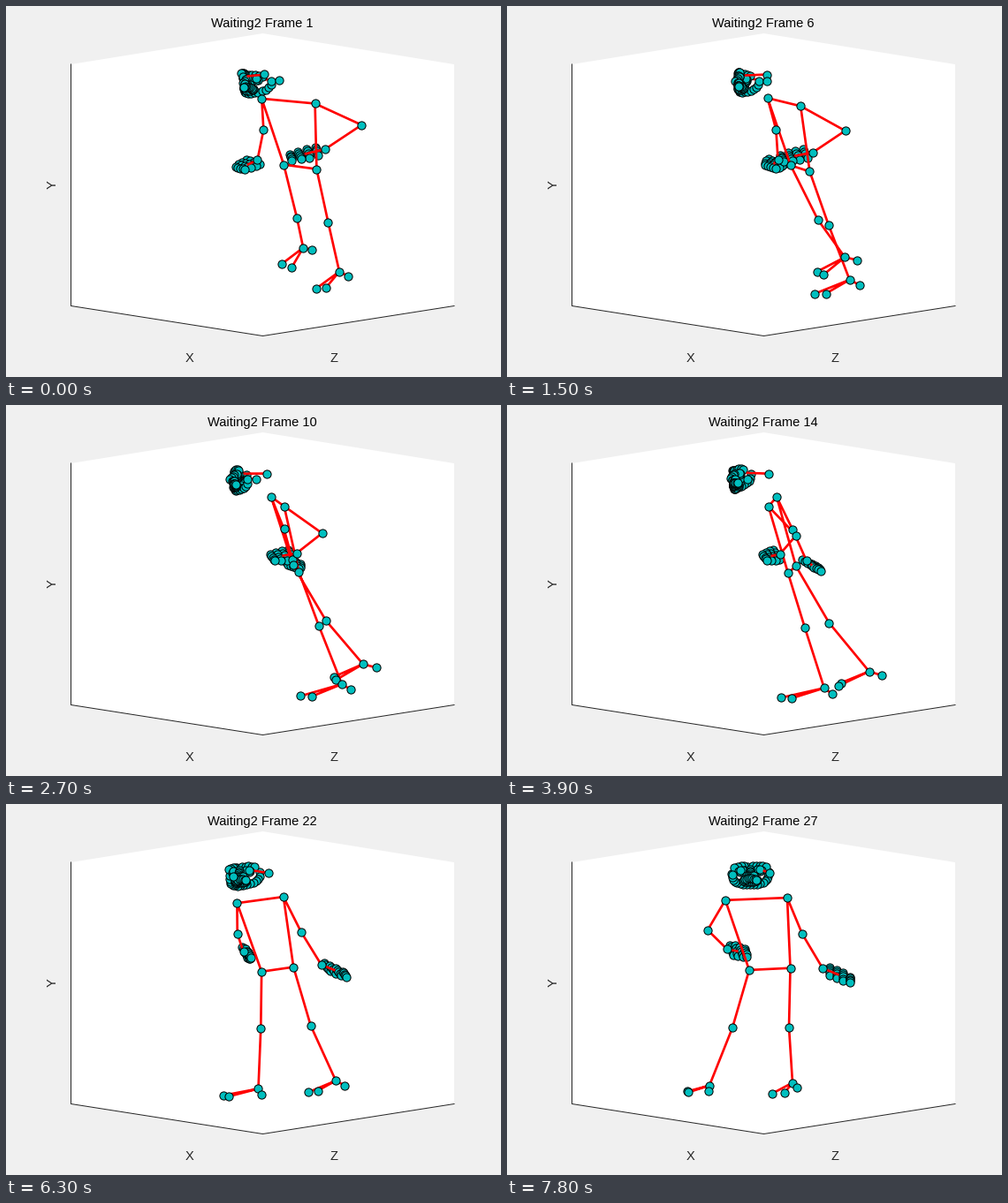
Write a matplotlib script that moves like this. It is 560 px wide and 420 px high and loops after 8000 ms.

```python
import numpy as np
import matplotlib.pyplot as plt
from matplotlib.animation import FuncAnimation

W, H, DPI = 560, 420, 100
PX = 72 / DPI
STEP_MS, TICK_MS, LOOP_MS = 300, 100, 8000
LAST_STEP, TURN = 26, np.radians(4.5)
INK, RED, TEAL = "#262626", "red", (0, 0.75, 0.75)

# Turning axis of each body level: screen x, view tilt, sideways roll.
LEVELS = dict(head=(292.5, 0.12, 0), arms=(301, 0.18, 0), hips=(307, 0.18, 0),
              knees=(280, 0.09, 0), feet=(242, 0.15, 0.08))

# Joints in the final pose: sideways from the axis, height on screen, depth.
SIDES = (
    dict(ear=(4, 78, 2), shoulder=(16, 107, -5), elbow=(33, 146, 6), wrist=(56, 184, 10),
         hip=(13.5, 183, 15), knee=(39, 246, 75), ankle=(81, 287, 147),
         big_toe=(72, 304, 115), small_toe=(58, 305, 121), heel=(86, 290, 161)),
    dict(ear=(-38, 80, -1), shoulder=(-54, 104, 27), elbow=(-74, 129, 76),
         wrist=(-52, 157, 41), hip=(-33, 182, 33), knee=(-25, 246, 82),
         ankle=(-13, 298, 145), big_toe=(-38, 313, 103), small_toe=(-37, 312, 116),
         heel=(-14, 303, 156)),
)
LEVEL_OF = dict(ear="head", shoulder="arms", elbow="arms", wrist="arms",
                hip="hips", knee="knees")
LIMBS = (("shoulder", "elbow", "wrist"), ("shoulder", "hip", "knee", "ankle"),
         ("big_toe", "ankle", "small_toe"), ("ankle", "heel"))

# Each hand: reach from the wrist to the fingertips, and half the fan of the fingers.
HANDS = ((np.array([31, 14, -6]), np.array([0, 3, 9])),
         (np.array([21, 10, -33]), np.array([2, 5.5, 3])))


def project(points, level, angle):
    """Turn points about the axis of their level and drop them on the screen."""
    axis, tilt, roll = LEVELS[level]
    x, y, z = np.asarray(points, float).T
    across = x * np.cos(angle) + z * np.sin(angle)
    near = z * np.cos(angle) - x * np.sin(angle)
    return np.column_stack([axis + across, y + tilt * near + roll * across])


def head_points(u, down, forward):
    """Sideways fraction, drop and reach of the face, which looks slightly askew."""
    u, down, forward = np.broadcast_arrays(u, down, forward)
    return np.column_stack([42 * u - 17.5, 78 + down, -forward - 11 * u])


def face_model():
    a = np.linspace(0, np.pi, 17)
    parts = [head_points(0.49 * np.cos(a), 2 + 15 * np.sin(a)**0.7,
                         16 + 14 * np.sin(a)**2)]
    ring = np.linspace(0, 2 * np.pi, 6, endpoint=False)
    brow = np.linspace(0.08, 0.42, 5)
    for side in (-1, 1):
        parts.append(head_points(side * brow, -3 - 1.5 * np.sin(7 * brow), 33 - 18 * brow))
        parts.append(head_points(side * (0.22 + 0.08 * np.cos(ring)),
                                 1 + 1.2 * np.sin(ring), 29 - 2 * np.cos(ring)))
    parts.append(head_points(0, np.linspace(0, 5, 4), np.linspace(31, 36, 4)))
    nostrils = np.linspace(-0.1, 0.1, 5)
    parts.append(head_points(nostrils, 7, 33 - 20 * abs(nostrils)))
    ring = np.linspace(0, 2 * np.pi, 20, endpoint=False)
    parts.append(head_points(0.18 * np.cos(ring), 12 + 2 * np.sin(ring),
                             32 - 3 * np.cos(ring)**2))
    return np.vstack(parts)


def hand_model(wrist, reach, fan):
    finger, along = np.meshgrid(np.linspace(-1, 1, 5), np.linspace(0.25, 1, 4))
    along, finger = along.ravel()[:, None], finger.ravel()[:, None]
    return wrist + along * reach + finger * fan * np.sin(1 + 1.4 * along)


FACE = face_model()
TEMPLES = head_points(np.array([0.35, -0.2]), 0, np.array([20, 31]))
GRIPS = [np.array(side["wrist"]) + 0.6 * reach for side, (reach, _) in zip(SIDES, HANDS)]

fig = plt.figure(figsize=(W / DPI, H / DPI), dpi=DPI, facecolor="#f0f0f0")
ax = fig.add_axes([0, 0, 1, 1])
ax.set(xlim=(0, W), ylim=(H, 0))
ax.axis("off")

ax.fill([73.5, 290.5, 507, 507, 290.5, 73.5], [66, 31, 66, 340, 374, 340],
        color="white", lw=0)
ax.plot([73.5, 73.5, 290.5, 507], [66, 339.5, 373.5, 339.5], color=INK, lw=PX)

font = dict(family="Liberation Sans", size=14.67 * PX, ha="center")
title = ax.text(290, 24, "", color="black", va="baseline", **font)
ax.text(208, 403, "X", color=INK, va="baseline", **font)
ax.text(371, 403, "Z", color=INK, va="baseline", **font)
ax.text(53, 202, "Y", color=INK, va="center", rotation=90, **font)


def lines(zorder):
    return ax.plot([], [], color=RED, lw=2.67 * PX, solid_capstyle="butt",
                   solid_joinstyle="round", zorder=zorder)[0]


def dots(zorder):
    return ax.plot([], [], "o", ms=9.2 * PX, mfc=TEAL, mec="black", mew=PX,
                   zorder=zorder)[0]


hidden_strut, clusters, bones, joints = lines(3), dots(4), lines(5), dots(6)


def draw(frame):
    step = frame * TICK_MS // STEP_MS
    angle = TURN * (LAST_STEP - step)
    poses = [{name: project([p], LEVEL_OF.get(name, "feet"), angle)[0]
              for name, p in side.items()} for side in SIDES]
    temples = project(TEMPLES, "head", angle)
    grips = project(GRIPS, "arms", angle)
    hands = [project(hand_model(side["wrist"], *hand), "arms", angle)
             for side, hand in zip(SIDES, HANDS)]

    chains = [[pose[name] for name in limb] for pose in poses for limb in LIMBS]
    chains += [[pose[name] for pose in poses] for name in ("shoulder", "hip")]
    chains += [[pose["wrist"], grip] for pose, grip in zip(poses, grips)]
    chains.append([poses[0]["ear"], temples[0]])

    gap = [np.full(2, np.nan)]
    bones.set_data(*np.array([p for chain in chains for p in chain + gap]).T)
    hidden_strut.set_data(*np.array([poses[1]["ear"], temples[1]]).T)
    clusters.set_data(*np.vstack([project(FACE, "head", angle), *hands]).T)
    joints.set_data(*np.array([p for pose in poses for p in pose.values()]).T)
    title.set_text(f"Waiting2 Frame {step + 1}")
    return hidden_strut, clusters, bones, joints, title


anim = FuncAnimation(fig, draw, frames=LOOP_MS // TICK_MS, interval=TICK_MS,
                     repeat=True, repeat_delay=0)
plt.show()
```
